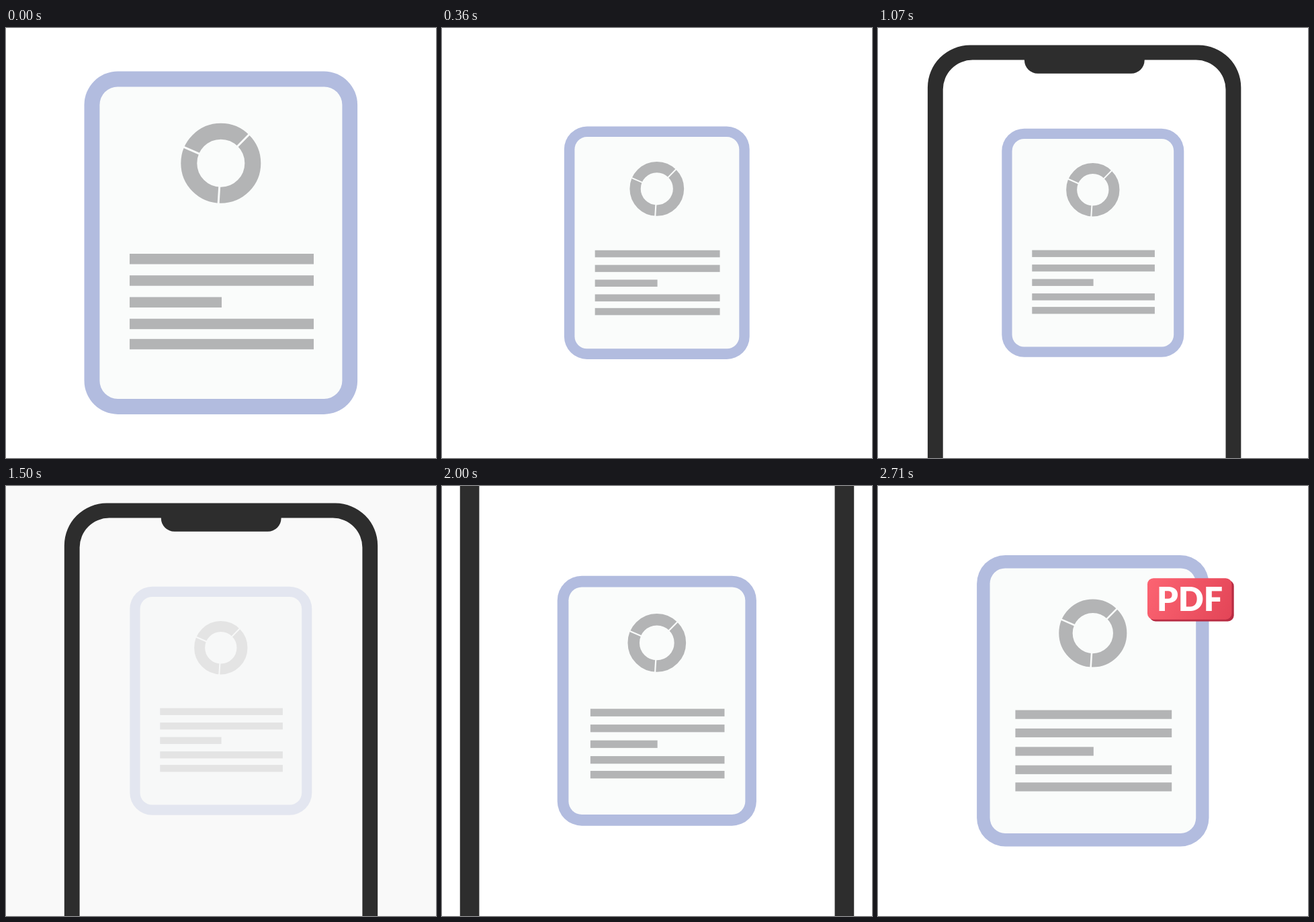
Recreate the animation shown at these times as an HTML page with a canvas. Size 640 px wide and 640 px high, loop 6 s.

```html
<!DOCTYPE html>
<html lang="en">
<head>
<meta charset="utf-8">
<title>Document to PDF</title>
<style>
  html, body { margin: 0; width: 100%; height: 100%; overflow: hidden; background: #fff; }
  canvas { display: block; width: 100vw; height: 100vh; }
</style>
</head>
<body>
<canvas id="stage" width="640" height="640"></canvas>
<script>
const ctx = document.getElementById('stage').getContext('2d');
const LOOP = 6000, FPS = 14;
const BORDER = '#b2bcdf', PAPER = '#fafcfb', GREY = '#b3b4b5', DARK = '#2d2d2d';

const clamp = x => Math.min(1, Math.max(0, x));
const smooth = x => x * x * (3 - 2 * x);
const progress = (t, start, duration) => clamp((t - start) / duration);

function backOut(x) {
  const s = 1.76, u = x - 1;
  return 1 + (s + 1) * u ** 3 + s * u * u;
}

function roundRect(x, y, w, h, r, fill) {
  ctx.beginPath();
  ctx.roundRect(x, y, w, h, r);
  ctx.fillStyle = fill;
  ctx.fill();
}

function scaledAround(x, y, scale, draw) {
  ctx.save();
  ctx.translate(x, y);
  ctx.scale(scale, scale);
  ctx.translate(-x, -y);
  draw();
  ctx.restore();
}

function drawRing(x, y) {
  ctx.beginPath();
  ctx.arc(x, y, 47.5, 0, Math.PI * 2);
  ctx.lineWidth = 24;
  ctx.strokeStyle = GREY;
  ctx.stroke();
  ctx.lineWidth = 3;
  ctx.strokeStyle = PAPER;
  for (const degrees of [-45.5, 93.5, 203.5]) {
    const a = degrees * Math.PI / 180, c = Math.cos(a), s = Math.sin(a);
    ctx.beginPath();
    ctx.moveTo(x + c * 34, y + s * 34);
    ctx.lineTo(x + c * 61, y + s * 61);
    ctx.stroke();
  }
}

function drawDocument() {
  roundRect(116.5, 64.5, 406.6, 510.4, 50, BORDER);
  roundRect(139.4, 87.4, 361, 464.6, 27, PAPER);
  drawRing(319.8, 201.2);
  ctx.fillStyle = GREY;
  for (const [y, w] of [[336, 274], [368.2, 274], [400.5, 137], [432.7, 274], [462.8, 274]]) {
    ctx.fillRect(184, y, w, 15.5);
  }
}

function drawPhone() {
  ctx.beginPath();
  ctx.roundRect(86.8, 25.6, 466.4, 950, 63);
  ctx.roundRect(109.6, 47.6, 420.8, 906, 44);
  ctx.fillStyle = DARK;
  ctx.fill('evenodd');
  roundRect(230.8, 46, 178.8, 21.8, [0, 0, 20, 20], DARK);
}

function drawBadge() {
  roundRect(404, 140, 125.7, 61.5, 9, '#b82b42');
  const red = ctx.createLinearGradient(401, 137, 526, 199);
  red.addColorStop(0, '#fc6472');
  red.addColorStop(1, '#e34557');
  roundRect(401, 137.2, 125.5, 61.5, 9, red);
  ctx.fillStyle = '#fff';
  ctx.font = '900 50px Lato, sans-serif';
  ctx.textAlign = 'center';
  ctx.fillText('PDF', 464, 186);
}

// Accelerating slide-in, then a damped bounce around the resting place.
function phoneOffset(t) {
  const arrival = 877, dt = t - arrival;
  if (dt < 0) {
    const s = Math.min(-dt, 420);
    return 2.24 * s - 0.00155 * s * s;
  }
  return -111 * Math.exp(-0.00888 * dt) * Math.sin(0.0125 * dt);
}

function render(t) {
  const shrink = smooth(progress(t, 0, 403));
  const zoom = smooth(progress(t, 1780, 640) ** 0.88);
  const pop = progress(t, 2420, 280);

  ctx.fillStyle = '#fff';
  ctx.fillRect(0, 0, 640, 640);
  scaledAround(319.8, 319.8, 1 - 0.3335 * shrink + 0.183 * zoom, drawDocument);

  if (t >= 1499 && t < 1640) {
    ctx.fillStyle = 'rgba(247, 247, 247, 0.72)';
    ctx.fillRect(0, 0, 640, 640);
  }
  if (zoom < 1) {
    scaledAround(320, 500, 1 + 0.76 * zoom, () => {
      ctx.translate(t < 1500 ? phoneOffset(t) : 0, 0);
      drawPhone();
    });
  }
  if (pop > 0) scaledAround(465.5, 169, backOut(pop), drawBadge);
}

const began = performance.now();
function tick() {
  const t = (performance.now() - began) % LOOP;
  render(Math.floor((t + 5) * FPS / 1000) % (LOOP * FPS / 1000) * 1000 / FPS);
  requestAnimationFrame(tick);
}
tick();
</script>
</body>
</html>
```
